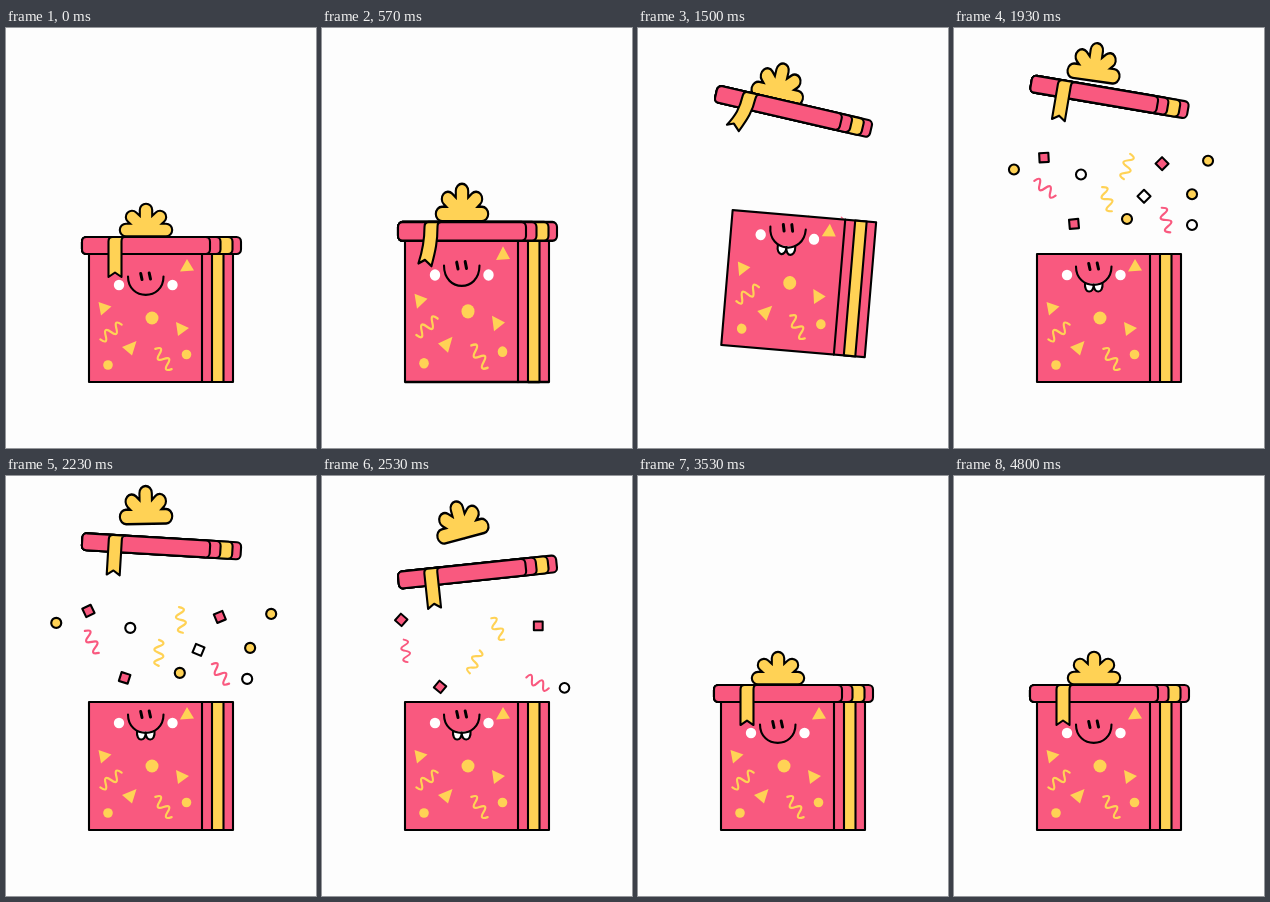
These frames come from a looping animation (310x420 px, 5010 ms). An HTML page:

```html
<!DOCTYPE html>
<html lang="en">
<head>
<meta charset="utf-8">
<title>Gift box</title>
<style>
  html, body { margin: 0; width: 100%; height: 100%; overflow: hidden; background: #fdfdfd; }
  svg { display: block; width: 100%; height: 100%; }
  .ink { stroke: #000; stroke-width: 2.1; stroke-linejoin: round; stroke-linecap: round; }
  .pink { fill: #f9597f; }
  .yellow { fill: #ffd255; }
  .white { fill: #fff; }
  .line { fill: none; stroke-linecap: round; stroke-linejoin: round; }
  .wave { stroke-width: 2.2; }
  .wave.pink { fill: none; stroke: #f9597f; }
  .wave.yellow { fill: none; stroke: #ffd255; }
</style>
</head>
<body>
<svg viewBox="0 0 310 420">
  <defs>
    <circle id="dot" r="5"/>
    <rect id="box" x="-4.6" y="-4.6" width="9.2" height="9.2"/>
    <path id="wave" d="M-13 0q3.25 -9 6.5 0t6.5 0t6.5 0t6.5 0"/>
    <path id="petals" d="M-20 -7H20M0 -7L-14 -20M0 -7V-27M0 -7L14 -20"/>
  </defs>

  <g id="confetti"></g>

  <g id="body">
    <rect class="ink pink" x="83" y="226" width="144" height="128"/>
    <rect class="ink yellow" x="206" y="226" width="11.5" height="128"/>
    <path class="ink" d="M196 226V354"/>
    <g class="yellow">
      <path d="M181 231L188 242.5L174 243.5ZM92.5 274L105.5 278.5L95 287.5ZM116 319L130.5 313L126 327.5ZM170 294L183 300L172 308Z"/>
      <circle cx="146" cy="290" r="6.5"/>
      <circle cx="180.5" cy="326.5" r="4.8"/>
      <circle cx="102" cy="337" r="4.8"/>
    </g>
    <use href="#wave" class="wave yellow line" transform="translate(105 304) rotate(-35) scale(1 -1)"/>
    <use href="#wave" class="wave yellow line" transform="translate(157.5 331) rotate(51)"/>
    <g id="face">
      <circle class="white" cx="113" cy="257" r="5.2"/>
      <circle class="white" cx="166.5" cy="257" r="5.2"/>
      <path id="teeth" class="ink white" d="M131 265.5C130 276 140 276 139.7 266.5C139.4 276 149.5 276 148.5 265.5"/>
      <path class="line ink" d="M122 248.5C122 273 157.5 273 157.5 248.5"/>
      <path class="line" stroke="#000" stroke-width="3" d="M134.7 245.5L136 251.5M143.2 245L144.5 251"/>
    </g>
  </g>

  <g id="bow" class="line">
    <use href="#petals" stroke="#000" stroke-width="14.5"/>
    <use href="#petals" stroke="#ffd255" stroke-width="10.3"/>
  </g>

  <g id="lid">
    <g id="bands"></g>
    <path id="ribbon" class="ink yellow"/>
  </g>
</svg>

<script>
const LOOP = 5010;
const FLOOR = 354;
const JUMP = 1500;   // the lid is off and the confetti starts
const DROP = 2530;   // the lid falls back
const LAND = 2600;

const el = id => document.getElementById(id);
const mix = (a, b, k) => a + (b - a) * k;
const part = (t, from, to) => Math.min(1, Math.max(0, (t - from) / (to - from)));
const ease = (t, from, to) => (1 - Math.cos(Math.PI * part(t, from, to))) / 2;
const hump = (t, from, to) => Math.sin(Math.PI * part(t, from, to)) ** 2;
const wobble = (t, from, period, fade) =>
  t < from ? 0 : Math.sin((t - from) / period * 2 * Math.PI) * Math.exp((from - t) / fade);
const place = (node, x, y, turn = 0, sx = 1, sy = sx) =>
  node.setAttribute('transform', `translate(${x} ${y}) rotate(${turn}) scale(${sx} ${sy})`);

function add(parent, tag, attrs) {
  const node = document.createElementNS('http://www.w3.org/2000/svg', tag);
  for (const name in attrs) node.setAttribute(name, attrs[name]);
  return parent.appendChild(node);
}

for (const [width, color] of [[159, 'pink'], [150.5, 'yellow'], [138.5, 'pink'], [128, 'pink']])
  add(el('bands'), 'rect', { class: `ink ${color}`, x: -79.5, y: -8.5, width, height: 17, rx: 4.5 });

// Mid-flight positions, in the order the pieces vanish
const pieces = [
  ['dot', 'yellow', 173, 191],
  ['box', 'white', 190, 168, 45],
  ['dot', 'white', 127, 146],
  ['dot', 'yellow', 254, 132],
  ['dot', 'yellow', 60, 141],
  ['dot', 'yellow', 238, 166],
  ['wave', 'pink', 91, 160, 35],
  ['wave', 'yellow', 173, 138, 104],
  ['wave', 'yellow', 153, 171, 68],
  ['wave', 'pink', 212, 192, 71],
  ['box', 'pink', 120, 196, -5],
  ['box', 'pink', 90, 129, -3],
  ['box', 'pink', 208, 135, 45],
  ['dot', 'white', 238, 197]
].map(([shape, color, x, y, angle = 0], i) => ({
  node: add(el('confetti'), 'use', {
    href: '#' + shape,
    class: `${shape === 'wave' ? 'wave line' : 'ink'} ${color}`
  }),
  x, y, angle,
  spin: i % 2 ? -0.075 : 0.075,
  reach: 0.2 - (y - 130) / 500,
  end: Math.min(DROP + 25, 2385 + 28 * i)
}));

function scatter(t) {
  const age = t - JUMP;
  const slow = Math.exp((430 - age) / 350);
  const rise = 1 - Math.exp(-age / 95);
  const fall = 17e-6 * age * age - 3.2;
  for (const p of pieces) {
    const size = age < 0 ? 0 : Math.min(0.6 + age / 200, 1) * part(t, p.end, p.end - 25);
    const x = 155 + (p.x - 155) * (1 + p.reach * (1 - slow));
    const startY = 193 + (x - 155) * 0.085;
    place(p.node, x, mix(startY, p.y + fall, rise), p.angle + p.spin * (age - 430), size);
  }
}

function ribbonPath(d) {
  const left = 31.5 - Math.max(0, d) * 0.4;
  const right = 31.5 + Math.min(0, d) * 0.4;
  return `M-49 -8.5Q-53 -8.5 -53 -4C-53 9 ${-53 - d * 0.3} 17 ${-53 - d} ${left}`
    + `L${-46.5 - d} ${(left + right) / 2 - 4.5}L${-40 - d} ${right}`
    + `C${-40 - d * 0.3} 17 -40 9 -40 -4Q-40 -8.5 -37 -8.5Z`;
}

function render(t) {
  const bounce = wobble(t, LAND, 280, 140);
  const stretch = 1 + 0.16 * hump(t, 470, 810) - 0.16 * hump(t, 800, 1340)
    + 0.11 * hump(t, 1330, 1560) - 0.06 * hump(t, 1690, 1880) - 0.14 * bounce;
  const lift = 34 * hump(t, 1360, 1710);
  const tilt = 4.9 * hump(t, 1330, 1700);
  const open = ease(t, 1350, JUMP) - ease(t, DROP + 5, LAND + 15);
  const grin = ease(t, 1330, 1440) - ease(t, DROP + 10, LAND + 20);
  const lean = 9 * hump(t, 470, 800) + 9 * hump(t, 1400, 1620) + 6 * bounce;

  el('body').setAttribute('transform',
    `translate(155 ${FLOOR - lift}) rotate(${tilt}) scale(1 ${stretch}) translate(-155 ${-FLOOR})`);
  place(el('face'), 0, -10 * grin);
  place(el('teeth'), 0, 265 * (1 - grin), 0, 1, grin);
  el('teeth').style.display = grin > 0.05 ? '' : 'none';

  // Lid and bow ride on the box while closed and float freely while open
  const closedY = y => FLOOR - lift - (FLOOR - y) * stretch;
  const air = Math.max(0, t - JUMP);
  const u = air / (DROP - JUMP);
  const lidY = 65.5 + 18 * Math.exp(-air / 250) + 30 * u ** 6;
  const bowY = 34.5 + 39 * Math.exp(-air / 600) + 21.5 * u ** 6;
  const bowTurn = open * (13 - 28 * u * u);

  place(el('lid'), 155.5, mix(closedY(217.5), lidY, open), open * (13 - 19 * u * u),
    1, mix(stretch, 1, open));
  place(el('bow'), 140 - bowTurn * 0.2, mix(closedY(209), bowY, open), bowTurn,
    1, mix(1 + (stretch - 1) * 1.5, 1.17, open));
  el('ribbon').setAttribute('d', ribbonPath(lean));
  scatter(t);
}

function tick() {
  render(performance.now() % LOOP);
  requestAnimationFrame(tick);
}
tick();
</script>
</body>
</html>
```
